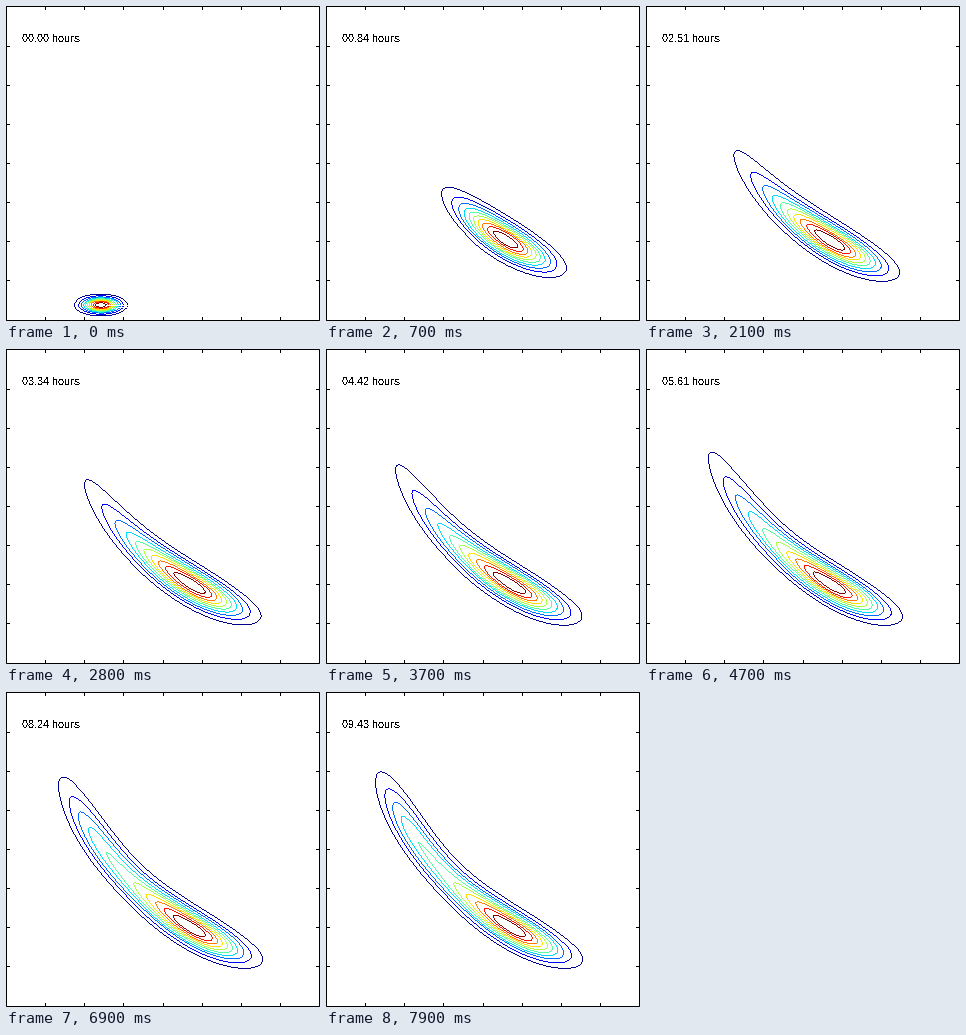
Animation of 314 by 315 pixels, one loop 8 s. Source, as a matplotlib script:

```python
from math import erf, sqrt

import numpy as np
import matplotlib.pyplot as plt
from matplotlib.animation import FuncAnimation

W, H = 314, 315
FRAMES, INTERVAL = 80, 100
HOURS_PER_FRAME = 0.11937
PX = 0.72  # one pixel in points at 100 dpi

plt.rcParams.update({
    "font.family": "Liberation Sans",
    "text.antialiased": False,
    "text.hinting": "native",
    "text.hinting_factor": 1,
})

# Contour levels k/11 of the peak, as Gaussian radii from outer to inner
RADII = np.sqrt(2 * np.log(11 / np.arange(1, 11)))
COLORS = (255 * plt.cm.jet(np.linspace(0.014, 1, 10))[:, :3]).astype(np.uint8)

# Curved valley along which the density spreads
VALLEY = np.polyfit([54, 77.5, 99.5, 140, 185, 215, 241, 255],
                    [82, 127.6, 159, 201, 236.5, 251.5, 263, 269], 4)
SLOPE = np.polyder(VALLEY)
WIDTH = 9.8

START, START_SIGMA = (94.5, 298.5), (12.1, 5.0)
TAU = 0.2

X = np.arange(0, 300, 0.1)
THETA = np.linspace(0, 2 * np.pi, 721)
COS, SIN = np.cos(THETA), np.sin(THETA)
normal_cdf = np.vectorize(lambda z: 0.5 + 0.5 * erf(z / sqrt(2)))


def profile(t):
    """Signed Gaussian radius of the density along the valley."""
    t = max(t, 0.3)
    settle = np.exp(-t / 1.1)
    d = X - (185 - 14 * settle)
    right = np.exp(-0.5 * (d / (32.3 - 8 * settle)) ** 2)
    left = 0.46 + 0.54 * np.exp(-0.5 * (d / 30) ** 2)
    # A soft front creeps up the left arm and sharpens as it stalls
    front = 45 + 110 * np.exp(-0.183 * t)
    blur = 30 * t ** 0.6 * np.exp(-0.225 * t)
    p = np.where(d < 0, left, right) * normal_cdf((X - front) / blur)
    peak = p.argmax()
    g = np.sqrt(-2 * np.log(np.maximum(p / p[peak], 1e-12)))
    return np.where(np.arange(len(X)) < peak, -g, g)


def contour(radius, g, blend):
    x = np.interp(radius * COS, g, X)
    slope = np.polyval(SLOPE, x)
    off = WIDTH * radius * SIN / np.hypot(1, slope)
    bent = np.array([x - off * slope, np.polyval(VALLEY, x) + off])
    ellipse = np.array([START[0] + START_SIGMA[0] * radius * COS,
                        START[1] + START_SIGMA[1] * radius * SIN])
    return ellipse + blend * (bent - ellipse)


def trace(canvas, pts, color):
    """Draw a hard one-pixel line, one pixel per step of the longer axis."""
    steps = np.abs(np.diff(pts)).max(axis=0)
    length = np.concatenate([[0], np.cumsum(steps)])
    at = np.arange(0, length[-1])
    col, row = (np.rint(np.interp(at, length, c)).astype(int) for c in pts)
    canvas[row, col] = color


fig = plt.figure(figsize=(W / 100, H / 100), dpi=100, facecolor="white")
ax = fig.add_axes([0, 0, 1, 1])
ax.axis("off")
image = ax.imshow(np.full((H, W, 3), 255, np.uint8), aspect="auto",
                  interpolation="nearest")
ax.set(xlim=(-0.5, W - 0.5), ylim=(H - 0.5, -0.5))


def stroke(xs, ys):
    ax.plot(xs, ys, color="black", lw=PX, snap=False,
            solid_capstyle="projecting", solid_joinstyle="miter")


stroke([0, W - 1, W - 1, 0, 0], [0, 0, H - 1, H - 1, 0])
for k in range(1, 8):
    tx, ty = int(k * (W - 1) / 8 + 0.5), 1 + 39 * k
    for end, inner in ((0, 3), (H - 1, H - 4)):
        stroke([tx, tx], [end, inner])
    for end, inner in ((0, 3), (W - 1, W - 4)):
        stroke([end, inner], [ty, ty])

label = ax.text(15, 36, "", fontsize=11 * PX, color="black", va="baseline")


def update(frame):
    t = frame * HOURS_PER_FRAME
    blend = 1 - np.exp(-t / TAU)
    g = profile(t)
    canvas = np.full((H, W, 3), 255, np.uint8)
    for radius, color in zip(RADII, COLORS):
        trace(canvas, contour(radius, g, blend), color)
    image.set_data(canvas)
    label.set_text(f"{t:05.2f} hours")
    return image, label


anim = FuncAnimation(fig, update, frames=FRAMES, interval=INTERVAL,
                     repeat=True, repeat_delay=0, blit=False)
plt.show()
```
